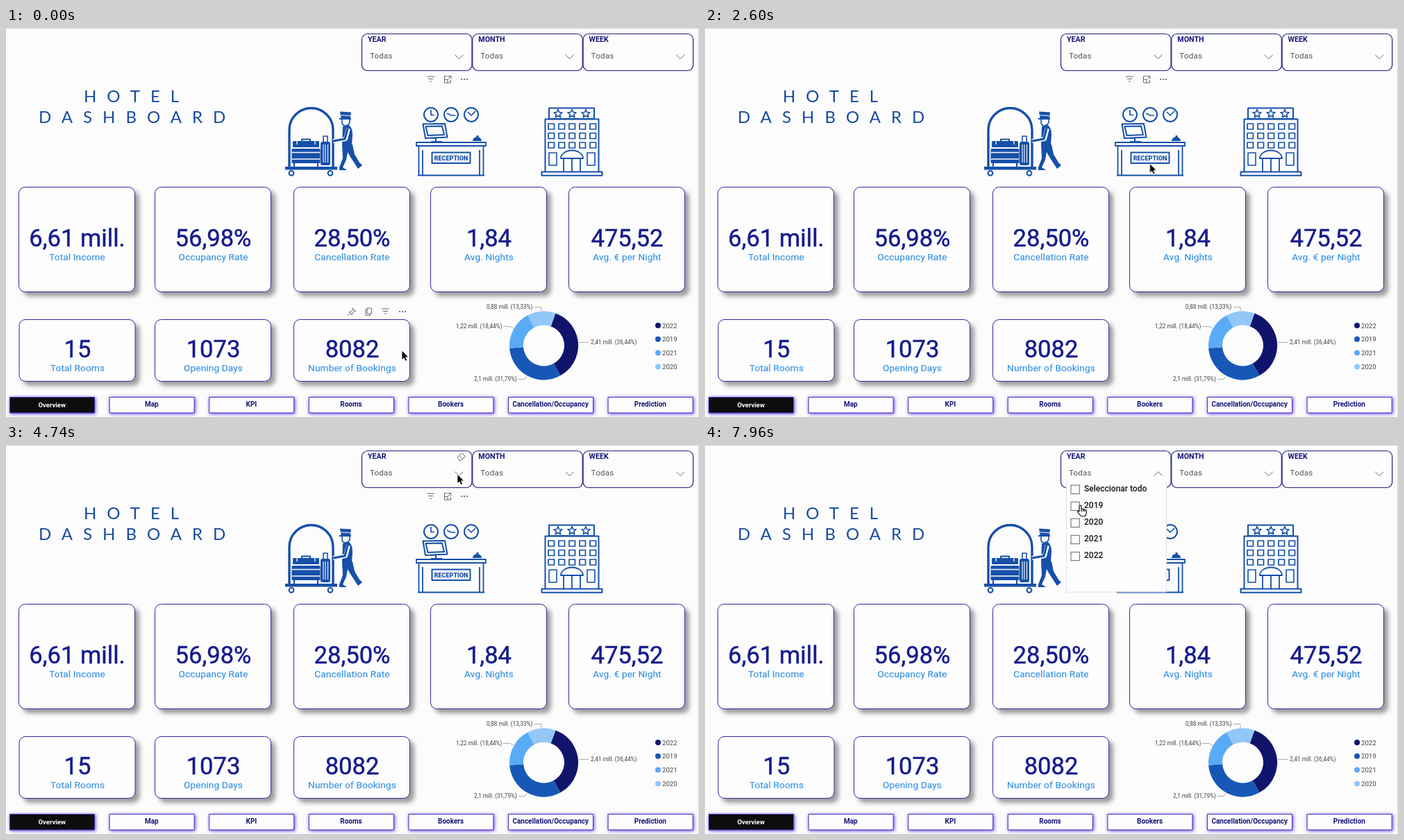
These frames come from a looping animation (998x561 px, 8 s). An HTML page:

```html
<!DOCTYPE html>
<html lang="en">
<head>
<meta charset="utf-8">
<title>Hotel dashboard</title>
<style>
html, body { margin: 0; width: 100%; height: 100%; overflow: hidden; background: #fcfcfd; }
svg { display: block; width: 998px; height: 561px; font-family: Roboto, "Open Sans", sans-serif; }
.card { fill: #fdfdfd; stroke: #29299c; filter: url(#cardShadow); }
.value { font-size: 34.6px; fill: #161c8c; stroke: #161c8c; stroke-width: .5; text-anchor: middle; }
.label { font-size: 13.6px; fill: #3390e4; stroke: #3390e4; stroke-width: .15; letter-spacing: .15px; text-anchor: middle; }
.title { font: 24px Lato, sans-serif; letter-spacing: 15px; fill: #174a9f; }
.slicer { fill: #fdfdfd; stroke: #20207e; stroke-width: 1.2; }
.head { font-size: 10.7px; font-weight: 700; fill: #15157a; }
.choice { font-size: 11.6px; fill: #555; letter-spacing: .2px; }
.option { font-size: 12px; font-weight: 500; fill: #161616; }
.tab { fill: #fdfdfd; stroke: #4930b8; filter: url(#glow); }
.tab.active { fill: #111; }
.tabText { font-size: 10px; font-weight: 700; fill: #15157a; text-anchor: middle; }
.note { font-size: 8.2px; fill: #444; }
.key { font-size: 9.6px; fill: #444; }
.thin { fill: none; stroke: #666; }
.ink { fill: none; stroke: #1650a8; stroke-width: 2; stroke-linejoin: round; }
.solid { fill: #1650a8; stroke: none; }
</style>
</head>
<body>
<svg id="stage" viewBox="0 0 998 561">
  <defs>
    <filter id="cardShadow" x="-10%" y="-10%" width="125%" height="135%">
      <feDropShadow dx="6" dy="6" stdDeviation="3.2" flood-color="#777" flood-opacity=".72"/>
    </filter>
    <filter id="glow" x="-10%" y="-50%" width="120%" height="200%">
      <feDropShadow dx="1" dy="1" stdDeviation="2.8" flood-color="#5a28f0" flood-opacity=".95"/>
    </filter>
    <g id="filterIcon" class="thin"><path d="M-5.5-4H5.5M-3.5-.5H3.5M-1.5 3H1.5"/></g>
    <g id="dots" fill="#555"><circle cx="-4" r="1.1"/><circle r="1.1"/><circle cx="4" r="1.1"/></g>
    <path id="star" d="M0-6 1.7-2 6-1.7 2.7 1 3.7 5.2 0 3-3.7 5.2-2.7 1-6-1.7-1.7-2Z"/>
  </defs>
  <path d="M0 .5H998" stroke="#d3d1ea"/>
  <path d="M997.5 0V561" stroke="#d8d8de"/>

  <text class="title" x="112" y="107">HOTEL</text>
  <text class="title" x="47" y="137">DASHBOARD</text>

  <!-- luggage trolley and porter -->
  <g class="ink">
    <path d="M408 201V147a31.500 31.500 0 0 1 63 0V201" stroke-width="3.4"/>
    <rect class="solid" x="402" y="200" width="75" height="4.5"/>
    <circle cx="411" cy="209.300" r="3.400"/><circle cx="467" cy="209.300" r="3.400"/>
    <path d="M426 163V160.500H438V163"/>
    <rect class="solid" x="413" y="163" width="38" height="9" rx="1.5"/>
    <rect class="solid" x="411.500" y="174" width="41" height="21" rx="1.5"/>
    <path d="M412 179.500H452M412 189H452M419 163V168M445 163V168" stroke="#fcfcfd" stroke-width="1.3"/>
    <path d="M415 195V200M449 195V200"/>
    <path d="M457 166V156H463V166" stroke-width="1.6"/>
    <rect class="solid" x="453" y="164" width="14" height="34" rx="3"/>
    <path d="M457 168V194M460 168V194M463.500 168V194" stroke="#fcfcfd" stroke-width="1.1"/>
    <path class="solid" d="M481 120.500 497 121.500 496 130H482.500ZM480 130H497V132H480Z"/>
    <path d="M482 125.800 497 126.600" stroke="#fcfcfd" stroke-width="1"/>
    <path d="M484 132V137q1 4 5 4 5-1 6-5V132" stroke-width="1.6"/>
    <path class="solid" d="M485 142 494 140q5 4 5 14L498 168H484Z"/>
    <path d="M493 145 489 160 471 163" stroke="#fcfcfd" stroke-width="6"/>
    <path d="M492 145 488 160 471 163" stroke-width="3"/>
    <path class="solid" d="M484 168H499L502 182 509 194 513 198 507 203 505 200 496 186 492 179 490 190 485 201 491 205H480L480 201 485 188Z"/>
  </g>

  <!-- reception desk -->
  <g class="ink" id="reception">
    <circle cx="612" cy="125" r="10"/><circle cx="641" cy="125" r="10"/><circle cx="670" cy="125" r="10"/>
    <path d="M612 118V125.500H617M635 123 641 126H647M665 121 670 126 676 120" stroke-width="1.7"/>
    <path d="M600.500 138.500 632 138 635.500 157.500 604 159ZM604.500 142 628 141.500 631 154 607.500 155ZM619 158V164M612 164H628"/>
    <path d="M591 165H691V170H591ZM594.500 170V212.500M687.500 170V212.500M593 212.500H689M600 176V212M682 176V212" stroke-width="1.8"/>
    <path class="solid" d="M672 163a6.500 6 0 0 1 13 0ZM677.500 155H680.500V157.500H677.500Z"/>
    <rect x="613.5" y="179.5" width="55" height="15.5"/>
    <text class="solid" x="641" y="190.5" text-anchor="middle" font-size="9" font-weight="900">RECEPTION</text>
  </g>

  <!-- hotel building -->
  <g class="ink" id="building">
    <path d="M782 115.500H847V131H782ZM776.500 207V131.500H853.500V207M771.500 207.500H858.500V212.800H771.500Z"/>
    <path d="M782 180H793V198H782ZM837 180H848V198H837Z" stroke-width="1.6"/>
    <path d="M799 188a16 11.500 0 0 1 32 0ZM803 188V207M827 188V207M815 188V207" stroke-width="1.8"/>
  </g>

  <g id="dashboard"></g>

  <g id="yearTools" transform="translate(611.5 74)">
    <use href="#filterIcon"/>
    <path class="thin" d="M24-4.500H20V5H29V1M25-4.500H29.500V-.500M29-4 24.500 .500M20 .500H24.500V5"/>
    <use href="#dots" x="48.5"/>
  </g>
  <g id="bookingTools" transform="translate(498 409)">
    <path class="thin" d="M1-5 5.500-.500 3 0 .500 2.500V5L-4 .500H-1.500L1-2ZM-2 2.500-5.500 6"/>
    <path class="thin" d="M22-5H28.500V3H22ZM22-3H20V5.500H26.500V3"/>
    <use href="#filterIcon" x="48.5"/><use href="#dots" x="73"/>
  </g>

  <g id="menu">
    <rect x="520" y="51.5" width="144" height="160" fill="#fdfdfd"/>
    <path d="M520.500 52V212H664.500V52" fill="none" stroke="#deddea"/>
  </g>
  <path id="eraser" class="thin" d="M650 17.500 656.500 11.500 661.500 16.500 655 22.500H653ZM652.500 15.500 657.500 20.500"/>

  <g id="pointer">
    <path id="arrow" d="M0 0V13.500L3 10.800 5.200 15.300 7.600 14.200 5.500 9.800H9.700Z" stroke="#fff" stroke-width=".8"/>
    <path id="hand" d="M0 1.200Q1.500-1 3 1.200V5.500Q4.500 4.300 5.500 5.900 7 4.900 8 6.500 10 5.900 10.300 8V11.500L8.800 15.500H2.300L-2.500 9.500Q-2.500 7.200 0 8.700ZM3 5.500V9M5.600 6.200V9M8 6.800V9.300" fill="#fff" stroke="#111" stroke-width="1.2"/>
  </g>
</svg>

<script>
const LOOP = 8000;
const $ = id => document.getElementById(id);
const add = (id, markup) => $(id).insertAdjacentHTML('beforeend', markup);
const text = (cls, x, y, str, extra = '') => `<text class="${cls}" x="${x}" y="${y}" ${extra}>${str}</text>`;
const rect = (cls, x, y, w, h, r = 0) => `<rect class="${cls}" x="${x}" y="${y}" width="${w}" height="${h}" rx="${r}"/>`;

// KPI cards
const card = (x, y, h, value, label, base) =>
  rect('card', x + .5, y + .5, 167, h, 9) +
  text('value', x + 84.5, base, value) + text('label', x + 84.5, base + 20, label);

[[18, '6,61 mill.', 'Total Income'], [214, '56,98%', 'Occupancy Rate'], [414, '28,50%', 'Cancellation Rate'],
 [611, '1,84', 'Avg. Nights'], [810, '475,52', 'Avg. € per Night']]
  .forEach(([x, value, label]) => add('dashboard', card(x, 229, 151, value, label, 315)));

[[18.5, '15', 'Total Rooms'], [214, '1073', 'Opening Days'], [414, '8082', 'Number of Bookings']]
  .forEach(([x, value, label]) => add('dashboard', card(x, 420, 89, value, label, 475)));

// Slicers
['YEAR', 'MONTH', 'WEEK'].forEach((name, i) => {
  const x = 512.5 + i * 159.3;
  add('dashboard', rect('slicer', x, 8.5, 158.5, 53, 8) +
    text('head', x + 8.5, 20, name) + text('choice', x + 11.5, 43.5, 'Todas') +
    `<path ${i ? '' : 'id="chevronDown"'} class="thin" d="M${x + 134} 38.5l6 6 6-6"/>`);
});
add('menu', '<path class="thin" d="M646.5 44.5l6-6 6 6"/>');

['Seleccionar todo', 2019, 2020, 2021, 2022].forEach((name, i) => {
  const y = 58 + i * 24.1;
  add('menu', rect('thin', 527, y, 12.3, 12.3) + text('option', 546, y + 9, name));
});

// Page tabs
['Overview', 'Map', 'KPI', 'Rooms', 'Bookers', 'Cancellation/Occupancy', 'Prediction'].forEach((name, i) => {
  const x = 5.5 + i * 143.6;
  add('dashboard', rect(i ? 'tab' : 'tab active', x, 532.5, 122, 22.5) +
    text('tabText', x + 60.7, i ? 546 : 547, name, i ? '' : 'style="fill:#fff;font-size:9.5px"'));
});

// Building windows and stars
for (let col = 0; col < 5; col++)
  for (let row = 0; row < 3; row++)
    add('building', `<rect x="${781 + col * 15}" y="${138 + row * 13.5}" width="8.5" height="8" stroke-width="1.7"/>`);
[795, 815, 835].forEach(x => add('building', `<use href="#star" x="${x}" y="123.5" stroke-width="1.6"/>`));

// Donut chart with legend
let turned = 0;
[[2022, 36.44, '#10156b'], [2019, 31.79, '#1758b6'], [2021, 18.44, '#5aabf5'], [2020, 13.33, '#92c7f8']]
  .forEach(([year, share, color], i) => {
    const y = 429 + i * 19.8;
    add('dashboard', `<circle cx="774.5" cy="458" r="39.5" fill="none" stroke="${color}" stroke-width="20"
      pathLength="100" stroke-dasharray="${share} 100" transform="rotate(${turned * 3.6 - 70} 774.5 458)"/>
      <circle cx="939" cy="${y}" r="4" fill="${color}"/>` + text('key', 945, y + 3.5, year));
    turned += share;
  });
[[692, 404.5, '0,88 mill. (13,33%)'], [648, 433, '1,22 mill. (18,44%)'],
 [842, 455.5, '2,41 mill. (36,44%)'], [674, 509, '2,1 mill. (31,79%)']]
  .forEach(([x, y, str]) => add('dashboard', text('note', x, y, str)));
add('dashboard', `<path fill="none" stroke="#aaa" d="M761 402.5H771V408M716 430.5H726L731 433
  M825 453.5H839M738 506.5H747L750 502"/>`);

// Motion
const play = (id, frames) => $(id).animate(frames, { duration: LOOP, iterations: Infinity });

const toggle = (id, steps) => play(id, [...steps, [LOOP, steps.at(-1)[1]]]
  .map(([ms, opacity]) => ({ offset: ms / LOOP, opacity, easing: 'step-end' })));

const route = [
  [0, 570, 465], [900, 580, 450], [1800, 627, 362], [3160, 650, 79.5], [3600, 650, 42],
  [5960, 650, 42], [6800, 637.5, 48.5], [7700, 539, 87], [LOOP, 539, 87]
];
play('pointer', route.map(([ms, x, y]) => ({ offset: ms / LOOP, transform: `translate(${x}px, ${y}px)` })));

const handSteps = [[0, 0], [3120, 1], [3340, 0], [7000, 1]];
toggle('hand', handSteps);
toggle('arrow', handSteps.map(([ms, on]) => [ms, 1 - on]));
toggle('bookingTools', [[0, 1], [2000, 0]]);
toggle('eraser', [[0, 0], [3440, 1], [7100, 0]]);
toggle('menu', [[0, 0], [5200, 1]]);
toggle('chevronDown', [[0, 1], [5200, 0]]);
</script>
</body>
</html>
```
